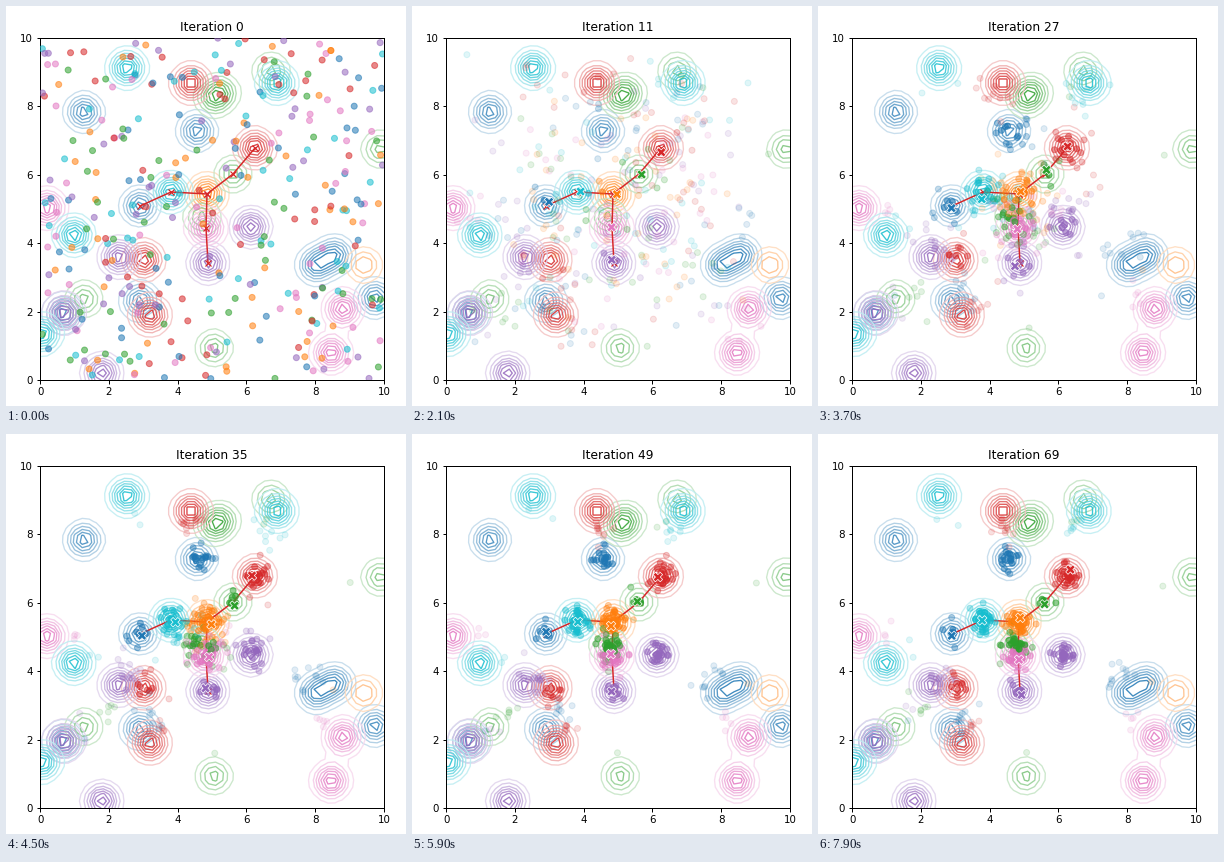
A matplotlib script for the animation above (8000 ms loop, 400 px wide and 400 px high).

```python
import numpy as np
import matplotlib.pyplot as plt
from matplotlib.animation import FuncAnimation
from matplotlib.colors import LinearSegmentedColormap, to_rgb

PX = 0.9                      # points per pixel at 80 dpi
X0, Y0, SX, SY = 34.1, 374.1, 34.4, 34.25
CENTER = np.array([202, 195])
PER_GROUP = 47
HOLD, STEPS = 11, 69
REACH = 185                   # peaks farther from the centre attract nobody
SIGMA = 0.3

# peak centres in pixels; the first of each colour is a node of the tree
PEAKS = {
    "blue": [(134, 200), (191, 125), (310, 259), (329, 249), (78, 106),
             (134, 295), (57, 307), (369, 292)],
    "orange": [(201, 188), (201, 188), (358, 259)],
    "green": [(227, 168), (196, 211), (78, 293), (208, 342), (374, 143),
              (265, 65), (207, 92), (215, 86)],
    "red": [(249, 142), (138, 254), (144, 309), (185, 77)],
    "purple": [(202, 257), (245, 221), (113, 251), (58, 307), (96, 367)],
    "pink": [(200, 222), (41, 202), (337, 303), (325, 347)],
    "cyan": [(165, 186), (121, 62), (271, 77), (68, 229), (36, 328)],
}
BRANCHES = ["blue cyan orange green red", "orange pink purple"]
COLORS = ["tab:" + name for name in PEAKS]
NODES = np.array([peaks[0] for peaks in PEAKS.values()], float)

rng = np.random.default_rng(12)


def to_data(px):
    px = np.asarray(px, float)
    return np.column_stack([(px[:, 0] - X0) / SX, (Y0 - px[:, 1]) / SY])


def reach(points):
    return np.linalg.norm(points - CENTER, axis=-1)


def choose_goals(pos, peaks):
    peaks = np.array(peaks, float)
    peaks = peaks[reach(peaks) < REACH]
    gap = np.linalg.norm(pos[:, None] - peaks, axis=2)
    return peaks[np.argmin(gap + 0.7 * reach(peaks), axis=1)]


# swarm: everyone starts anywhere and drifts to a peak of its own colour
total = PER_GROUP * len(COLORS)
group = rng.permutation(total) % len(COLORS)
rgb = np.array([to_rgb(c) for c in COLORS])[group]
start = rng.uniform((X0, Y0 - 10 * SY), (X0 + 10 * SX, Y0), (total, 2))
goal = np.empty_like(start)
for g, peaks in enumerate(PEAKS.values()):
    goal[group == g] = choose_goals(start[group == g], peaks)

weight = 1 / (1 + (reach(goal) / 98) ** 8)
rest = goal + 0.18 * (1 - weight)[:, None] * (CENTER - goal)
tau = rng.uniform(12, 24, total)
swing = rng.normal(0, 8.5, (total, 2))
speed = rng.uniform(0.3, 1.1, (total, 2))
phase = rng.uniform(0, 2 * np.pi, (total, 2))
first = rng.normal(0, 10, NODES.shape)
wobble = rng.normal(0, 2.6, (STEPS + 1, *NODES.shape))


def swarm_at(n):
    if n == 0:
        return start, np.full(total, 0.55)
    left = 0.93 * np.exp(-(n / tau) ** 1.5)
    pos = rest + left[:, None] * (start - rest)
    pos = pos + swing * (1 + 0.5 * np.exp(-n / 15)) * np.cos(speed * n + phase)
    dist = np.linalg.norm(pos - goal, axis=1)
    return pos, 0.13 + 0.57 * weight * np.exp(-(dist / 18) ** 2)


def best_at(n):
    fade = np.exp(-(n - 1) / 4)
    return NODES + fade * first + (1 - fade) * wobble[n]


fig = plt.figure(figsize=(5, 5), dpi=80, facecolor="white")
ax = fig.add_axes([X0 / 400, 1 - Y0 / 400, SX / 40, SY / 40])

gx, gy = np.meshgrid(*[np.linspace(0, 10, 50)] * 2)
for color, peaks in zip(COLORS, PEAKS.values()):
    field = sum(np.exp(-((gx - x) ** 2 + (gy - y) ** 2) / (2 * SIGMA ** 2))
                for x, y in to_data(peaks))
    pale = 0.72 + 0.28 * np.array(to_rgb(color))
    cmap = LinearSegmentedColormap.from_list(color, [pale, to_rgb(color)])
    ax.contour(gx, gy, field, levels=field.max() * np.linspace(0.11, 0.88, 7),
               cmap=cmap, linewidths=1.35 * PX, alpha=0.85, zorder=1)

for branch in BRANCHES:
    route = [PEAKS[name][0] for name in branch.split()]
    ax.plot(*to_data(route).T, "-x", color="tab:red", lw=1.5 * PX, ms=6 * PX,
            mew=1.2 * PX, zorder=2)

dots = ax.scatter(*to_data(start).T, s=(6 * PX) ** 2, linewidths=PX, zorder=3)
bests = ax.scatter(*to_data(NODES).T, s=(9.5 * PX) ** 2, marker="X", c=COLORS,
                   edgecolors="white", linewidths=0.7 * PX, zorder=4)

ax.set(xlim=(0, 10), ylim=(0, 10), xticks=range(0, 11, 2), yticks=range(0, 11, 2))
ax.tick_params(labelsize=10.3 * PX, length=3.5 * PX, width=PX, pad=3.5 * PX)
for spine in ax.spines.values():
    spine.set_linewidth(PX)
title = ax.set_title("Iteration 0", fontsize=12.3 * PX, pad=6.3 * PX)


def draw(frame):
    n = max(0, frame - HOLD + 1)
    pos, alpha = swarm_at(n)
    rgba = np.column_stack([rgb, alpha])
    dots.set_offsets(to_data(pos))
    dots.set_facecolor(rgba)
    dots.set_edgecolor(rgba)
    bests.set_visible(n > 0)
    if n:
        bests.set_offsets(to_data(best_at(n)))
    title.set_text(f"Iteration {n}")
    return dots, bests, title


anim = FuncAnimation(fig, draw, frames=HOLD + STEPS, interval=100, repeat=True)
plt.show()
```
